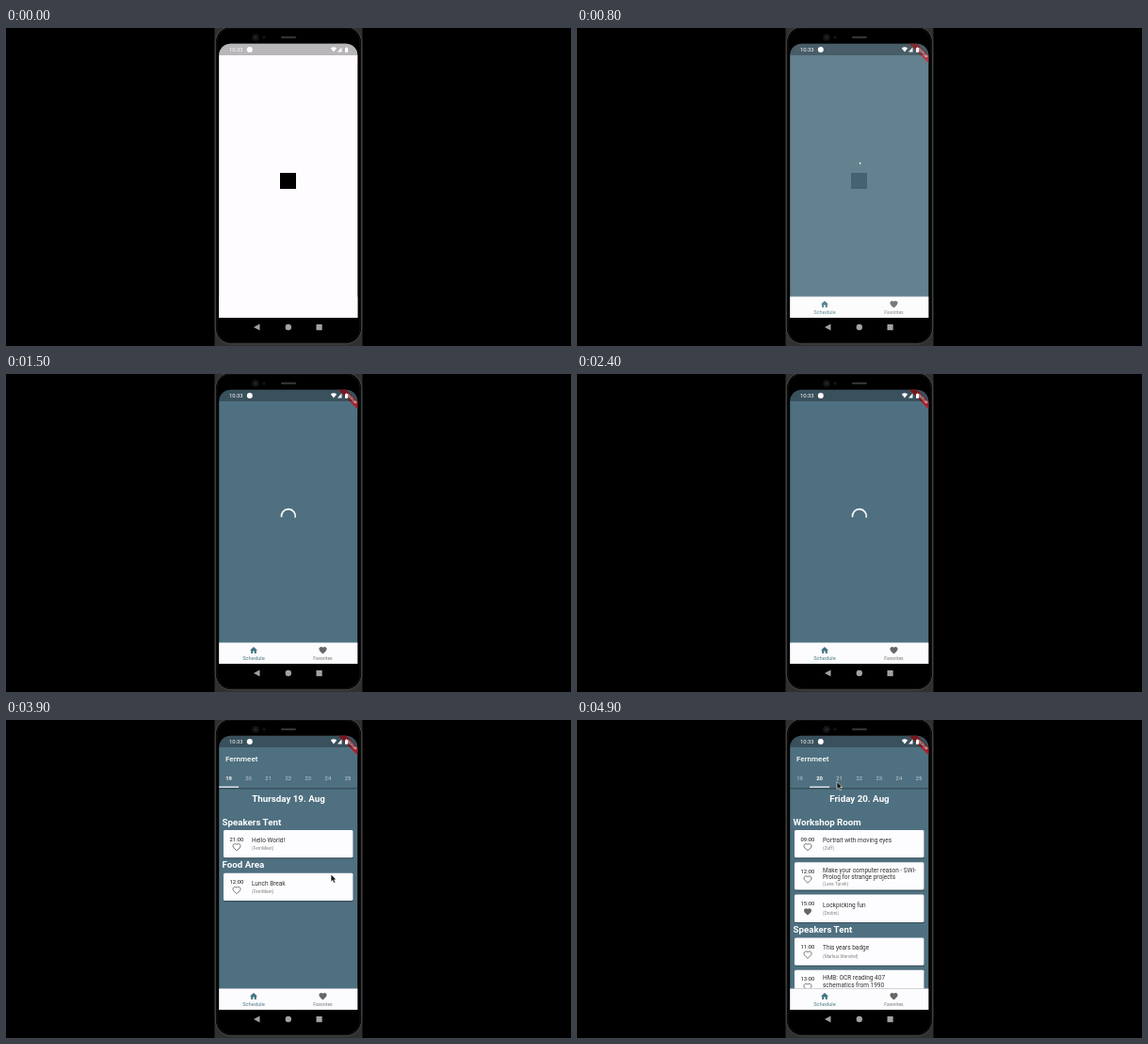
Animation, 600 px wide and 338 px high, one loop 5 s. Source, as an HTML page:

```html
<!DOCTYPE html>
<html lang="en">
<head>
<meta charset="utf-8">
<title>Schedule app</title>
<style>
  html, body { margin: 0; width: 100%; height: 100%; overflow: hidden; background: #000; }
  svg { display: block; width: 100%; height: 100%; font-family: Roboto, sans-serif; }
</style>
</head>
<body>
<svg viewBox="0 0 600 338">
  <defs>
    <path id="heart" d="M12 21.35l-1.45-1.32C5.4 15.36 2 12.28 2 8.5 2 5.42 4.42 3 7.5 3c1.74 0 3.41.81 4.5 2.09C13.09 3.81 14.76 3 16.5 3 19.58 3 22 5.42 22 8.5c0 3.78-3.4 6.86-8.55 11.54z"/>
    <path id="home" d="M10 20v-6h4v6h5v-8h3L12 3 2 12h3v8z"/>
    <clipPath id="screen"><path d="M226.200 308V29a12.300 12.300 0 0 1 12.300-12.300H361a12.300 12.300 0 0 1 12.300 12.300V308z"/></clipPath>
    <clipPath id="body"><path d="M226 73H374V285.500H226z"/></clipPath>
    <linearGradient id="barShadow" x2="0" y2="1">
      <stop stop-color="#000" stop-opacity=".35"/><stop offset="1" stop-color="#000" stop-opacity="0"/>
    </linearGradient>
  </defs>

  <!-- phone -->
  <path fill="#303030" d="M221.500 0H378.500V338H221.500z"/>
  <rect x="222.300" y="-1.500" width="155.400" height="337.300" rx="17" stroke="#4a4a4a"/>
  <rect x="224" y="0" width="152" height="334.500" rx="15" stroke="#1a1a1a" stroke-width=".7"/>
  <circle cx="265" cy="10" r="3.800" fill="#141417"/>
  <circle cx="265" cy="10" r="1.500" fill="#24242a"/>
  <circle cx="274" cy="10" r="1.700" fill="#141417"/>
  <rect x="292" y="8.800" width="16" height="2.200" rx="1.100" fill="#333"/>
  <g fill="#a2a2a2">
    <path d="M263 318L269.500 314.500V321.500z"/>
    <circle cx="299.800" cy="318" r="3.200"/>
    <path d="M329.500 315H335.700V321.200H329.500z"/>
  </g>

  <g clip-path="url(#screen)">
    <path fill="#4f7080" d="M226 16H374V309H226z"/>
    <path id="spinner" fill="none" stroke="#fff" stroke-width="1.600"/>
    <g id="content">
      <g clip-path="url(#body)"><g id="pages"></g></g>
      <path fill="url(#barShadow)" d="M226 72H374V74.500H226z"/>
      <g id="tabs"></g>
      <rect id="indicator" y="70.600" width="21.100" height="1.200" fill="#fff"/>
    </g>
    <path fill="#fcfbfd" d="M226 285.500H374V308.500H226z"/>
    <g id="nav"></g>
    <path fill="#a8202b" d="M353 16H360.500L374 29.500V38L352 16z"/>
    <text transform="translate(366.300 27.200) rotate(45)" text-anchor="middle" font-size="4" font-weight="900" fill="#eee">DEBUG</text>
    <g id="splash">
      <path fill="#fefcfe" d="M226 16H374V309H226z"/>
      <rect x="291" y="154" width="17" height="17"/>
    </g>
    <path fill-opacity=".28" d="M226 16H374V29H226z"/>
    <g fill="#fff">
      <text x="237" y="25.200" font-size="5.900">10:33</text>
      <circle cx="258.800" cy="23" r="3"/>
      <path d="M344.800 21.400Q348 18.900 351.200 21.400L348 25.600zM352 25.600H356.500V20.600zM360 21.200H361V20.400H362.200V21.200H363.200V25.800H360z"/>
    </g>
  </g>
  <path id="cursor" d="M0 0V8L1.900 6.400 3.200 9.300 4.700 8.600 3.400 5.800H5.800z" fill="#111" stroke="#fff" stroke-width=".6"/>
</svg>

<script>
const LOOP = 5000, STEP = 100, LEFT = 226, WIDTH = 147.5, TAB = WIDTH / 7;
const el = id => document.getElementById(id);
const clamp = v => Math.min(1, Math.max(0, v));
const lerp = (a, b, p) => a + (b - a) * p;
const smooth = p => p * p * (3 - 2 * p);

// Text placed by the vertical middle of its capitals.
const label = (text, x, middle, size, fill, weight = 400, anchor = "start") =>
  `<text x="${x}" y="${middle + size * .355}" font-size="${size}" fill="${fill}" font-weight="${weight}" text-anchor="${anchor}">${text}</text>`;

const icon = (name, x, y, scale, style) =>
  `<use href="#${name}" transform="translate(${x} ${y}) scale(${scale}) translate(-12 -12)" ${style}/>`;

function card(top, { time, title, by, liked }) {
  const lines = title.split("\n"), double = lines.length > 1;
  const heart = liked ? 'fill="#666"' : 'fill="none" stroke="#555" stroke-width="2"';
  return `<rect x="231" y="${top + .8}" width="138" height="29.6" rx="1.5" fill-opacity=".3"/>
    <rect x="231" y="${top}" width="137.5" height="29.3" rx="1.5" fill="#fdfcfe"/>` +
    label(time, 245, top + 9.6, 5.9, "#444", 500, "middle") +
    icon("heart", 245, top + 18.2, .4, heart) +
    lines.map((line, i) => label(line, 261, top + (double ? 8 : 10.6) + i * 7.7, 6.5, "#333")).join("") +
    label(`(${by})`, 261, top + (double ? 22.6 : 19.5), 4.75, "#858585");
}

function page(offset, title, rooms) {
  let top = 105.5, out = label(title, 300, 84, 9.75, "#fff", 700, "middle");
  for (const [room, talks] of rooms) {
    out += label(room, 229.5, top + 2.7, 9.75, "#fff", 700);
    top += 11.5;
    for (const talk of talks) {
      out += card(top, talk);
      top += 34.3;
    }
  }
  return `<g transform="translate(${offset} 0)">${out}</g>`;
}

el("pages").innerHTML =
  page(0, "Thursday 19. Aug", [
    ["Speakers Tent", [{ time: "21:00", title: "Hello World!", by: "FernMeet" }]],
    ["Food Area", [{ time: "12:00", title: "Lunch Break", by: "FernMeet" }]]
  ]) +
  page(WIDTH, "Friday 20. Aug", [
    ["Workshop Room", [
      { time: "09:00", title: "Portrait with moving eyes", by: "Zuff" },
      { time: "12:00", title: "Make your computer reason - SWI-\nProlog for strange projects", by: "Lene Tarvik" },
      { time: "15:00", title: "Lockpicking fun", by: "Drobni", liked: true }
    ]],
    ["Speakers Tent", [
      { time: "11:00", title: "This years badge", by: "Markus Wendrel" },
      { time: "13:00", title: "HMB: OCR reading 407\nschematics from 1990", by: "Zuff" }
    ]]
  ]);

el("nav").innerHTML =
  icon("home", 263, 293.7, .4, 'fill="#3f7480"') + label("Schedule", 263, 301.8, 5.8, "#4f7f8a", 400, "middle") +
  icon("heart", 336.5, 293.6, .41, 'fill="#666"') + label("Favorites", 336.5, 302, 5, "#777", 400, "middle");

function drawTabs(selected) {
  el("tabs").innerHTML = label("Fernmeet", 233, 41, 8.1, "#fff", 500) +
    Array.from({ length: 7 }, (_, i) => i === selected
      ? label(19 + i, LEFT + TAB * (i + .5), 61.5, 5.9, "#fff", 700, "middle")
      : label(19 + i, LEFT + TAB * (i + .5), 61.5, 5.9, "#c5d0d5", 400, "middle")).join("");
}

// Material easing, cubic-bezier(.4, 0, .2, 1), solved by bisection.
function fastOutSlowIn(x) {
  let low = 0, high = 1;
  for (let i = 0; i < 20; i++) {
    const s = (low + high) / 2;
    if (1.2 * s * (1 - s) ** 2 + .6 * s * s * (1 - s) + s ** 3 < x) low = s; else high = s;
  }
  return smooth(low);
}

function drawSpinner(t) {
  const ms = clamp((t - 800) / 700) * 838;
  const head = fastOutSlowIn(clamp(ms / 666.5)), tail = fastOutSlowIn(clamp(ms / 666.5 - 1));
  const start = -90 + 270 * tail + 360 * ms / 2222 + 90 * ms / 1333;
  const sweep = Math.max(270 * (head - tail), 12);
  const point = angle => {
    const a = angle * Math.PI / 180;
    return `${299.9 + 7.4 * Math.cos(a)} ${151 + 7.4 * Math.sin(a)}`;
  };
  el("spinner").setAttribute("d", `M${point(start)}A7.4 7.4 0 ${+(sweep > 180)} 1 ${point(start + sweep)}`);
}

function draw(t) {
  const loaded = t >= 3300, swipe = smooth(clamp((t - 4700) / 200));
  el("splash").setAttribute("opacity", t < 700 ? 1 : t < 800 ? .83 : t < 900 ? .12 : 0);
  el("spinner").style.display = loaded ? "none" : "";
  el("content").style.display = loaded ? "" : "none";
  drawSpinner(t);
  drawTabs(Math.round(swipe));
  el("pages").setAttribute("transform", `translate(${-WIDTH * swipe} 0)`);
  el("indicator").setAttribute("x", LEFT + TAB * swipe);

  const approach = smooth(clamp((t - 3800) / 700)), leave = clamp((t - 4700) / 200);
  const x = lerp(350, 261, approach) + 15 * leave;
  const y = lerp(170, 61.5, approach) + 4 * leave * leave;
  el("cursor").style.display = t >= 3900 ? "" : "none";
  el("cursor").setAttribute("transform", `translate(${x} ${y})`);
}

let last = -1;
function tick() {
  const t = Math.floor(performance.now() % LOOP / STEP) * STEP;
  if (t !== last) draw(last = t);
  requestAnimationFrame(tick);
}
tick();
</script>
</body>
</html>
```
